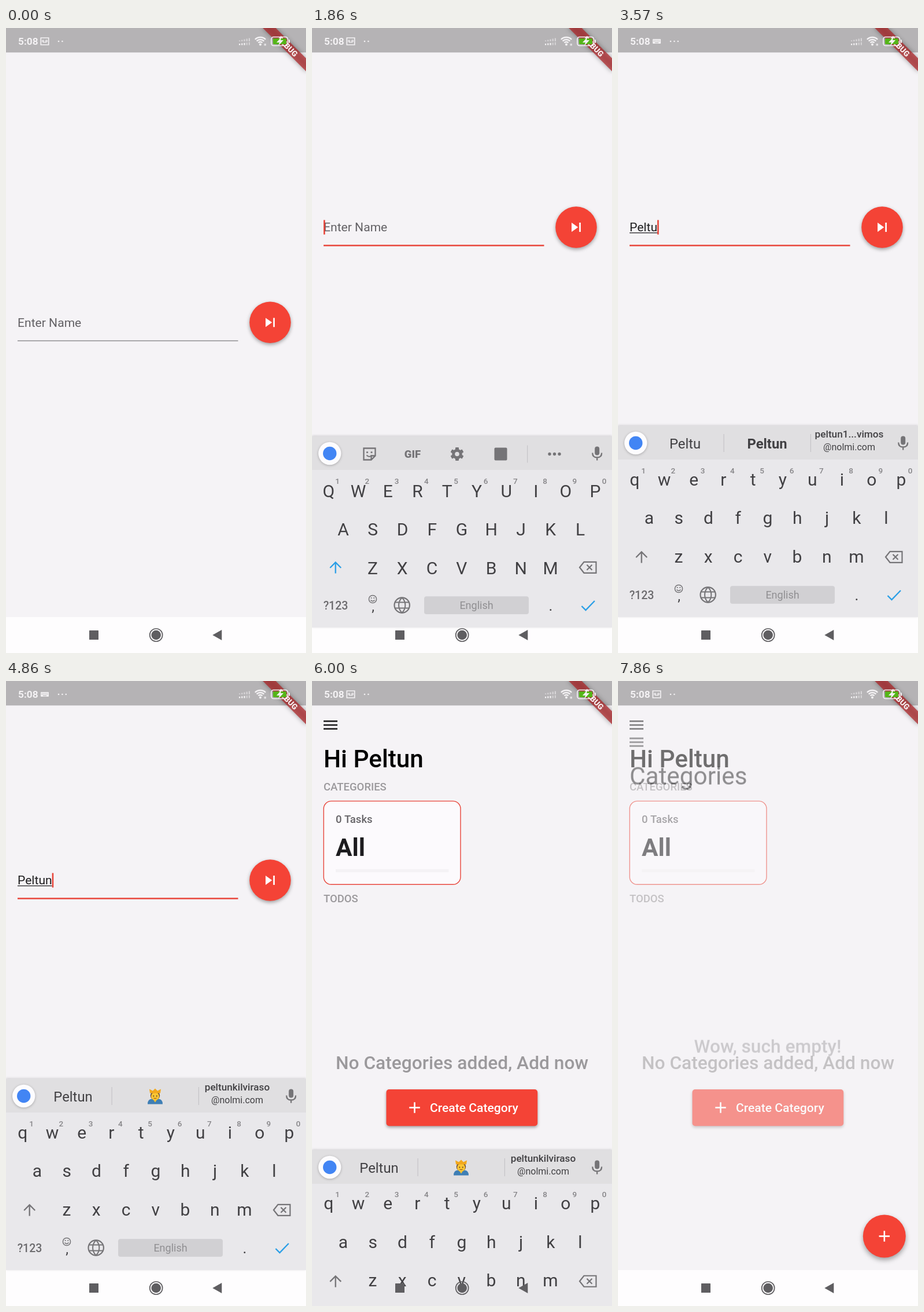
An HTML page with a canvas for the animation above (8 s loop, 519 px wide and 1079 px high).

```html
<!DOCTYPE html>
<html lang="en">
<head>
<meta charset="utf-8">
<title>Todo app walkthrough</title>
<style>
html, body { margin: 0; width: 100%; height: 100%; overflow: hidden; background: #f5f3f6; }
canvas { display: block; width: 519px; height: 1079px; }
</style>
</head>
<body>
<canvas id="stage" width="519" height="1079"></canvas>
<script>
const W = 519, H = 1079, LOOP = 8000, STEPS = 56;
const NAV_TOP = 1017, KB_TOP = 687, KB_ROWS = 745;
const RED = '#f44336', PAGE = '#f5f3f6', GREY = '#9b999c', KEY = '#414043', ICON = '#757477', BLUE = '#2b9fe6';
const NAME = 'Peltun';

const screen = document.getElementById('stage').getContext('2d');
const layer = document.createElement('canvas');
layer.width = W;
layer.height = H;
const layerCtx = layer.getContext('2d');
let c = screen;

// ---------- drawing helpers ----------
function text(str, x, y, size, color, weight = 400, align = 'left') {
  c.font = `${weight} ${size}px Roboto, sans-serif`;
  c.textAlign = align;
  c.fillStyle = color;
  c.fillText(str, x, y);
}

function rect(x, y, w, h, color, r = 0) {
  c.fillStyle = color;
  c.beginPath();
  c.roundRect(x, y, w, h, r);
  c.fill();
}

function disc(x, y, r, color) {
  c.fillStyle = color;
  c.beginPath();
  c.arc(x, y, r, 0, 7);
  c.fill();
}

function ring(x, y, r, width, color) {
  c.strokeStyle = color;
  c.lineWidth = width;
  c.beginPath();
  c.arc(x, y, r, 0, 7);
  c.stroke();
}

function shape(d, x, y, color, scale = 1) {
  c.save();
  c.translate(x, y);
  c.scale(scale, scale);
  c.fillStyle = color;
  c.fill(new Path2D(d));
  c.restore();
}

function stroke(d, x, y, color, width) {
  c.save();
  c.translate(x, y);
  c.strokeStyle = color;
  c.lineWidth = width;
  c.stroke(new Path2D(d));
  c.restore();
}

function shadowed(blur, dy, alpha, draw) {
  c.save();
  c.shadowColor = `rgba(0,0,0,${alpha})`;
  c.shadowBlur = blur;
  c.shadowOffsetY = dy;
  draw();
  c.restore();
}

function bezier(t, x1, y1, x2, y2) {
  const at = (u, a, b) => 3 * u * (1 - u) ** 2 * a + 3 * u * u * (1 - u) * b + u ** 3;
  let lo = 0, hi = 1;
  for (let i = 0; i < 24; i++) {
    const mid = (lo + hi) / 2;
    if (at(mid, x1, x2) < t) lo = mid; else hi = mid;
  }
  return at(lo, y1, y2);
}

// ---------- app pages ----------
function menuIcon(y) {
  for (const dy of [-6.6, 0, 6.6]) rect(20, y + dy - 1.3, 24, 2.6, '#1d1c1e');
}

function plus(x, y, size) {
  rect(x - size / 2, y - 1.3, size, 2.6, '#fff');
  rect(x - 1.3, y - size / 2, 2.6, size, '#fff');
}

function namePage(k) {
  const focused = k >= 12;
  const y = k >= 13 ? 344 : 508.3;
  const typed = NAME.slice(0, [19, 20, 22, 23, 25, 27].filter(s => k >= s).length);
  const cursor = (k >= 12 && k < 15) || (k >= 19 && k < 30) || (k >= 33 && k < 37);

  rect(0, 0, W, H, PAGE);
  text(typed || 'Enter Name', 20, y + 7.3, 21.1, typed ? '#1f1e20' : '#636165');
  const end = 20 + (typed ? c.measureText(typed).width : 0);
  if (typed) rect(20, y + 9, end - 20, 1.2, '#1f1e20');
  if (cursor) rect(end, y - 12.5, 2.6, 25, '#e8453a');
  if (focused) rect(20, y + 30.2, 381.5, 2.6, '#e8453a');
  else rect(20, y + 31, 381.5, 1.4, '#918f92');

  shadowed(6, 2.5, 0.36, () => disc(457, y, 35.8, RED));
  if (k >= 3 && k < 7) {
    disc(457, y, 9 * (k - 2), `rgba(255,255,255,${0.2 - 0.045 * (k - 3)})`);
  }
  shape('M-6 6L2.5 0L-6-6zM4-6h2v12h-2z', 457, y, '#fff', 1.32);
}

function homePage() {
  rect(0, 0, W, H, PAGE);
  menuIcon(76);
  text('Hi ' + NAME, 20, 149, 42.3, '#000', 500);
  text('CATEGORIES', 20, 189.3, 18.5, GREY, 500);
  rect(20.2, 207.4, 236.8, 143.8, '#fcfafd', 13);
  c.strokeStyle = '#e8453a';
  c.lineWidth = 1.4;
  c.stroke();
  text('0 Tasks', 41, 245, 18.5, '#666468', 500);
  text('All', 41, 302, 42.3, '#1d1c1f', 700);
  rect(41, 325, 195.5, 5.2, '#f4f2f5');
  text('TODOS', 20, 382.3, 18.5, GREY, 500);
  text('No Categories added, Add now', 259.5, 670, 31.7, GREY, 500, 'center');
  shadowed(5, 2.5, 0.34, () => rect(128.5, 705, 261.7, 63.3, RED, 5));
  plus(177.5, 736.5, 18.5);
  text('Create Category', 204, 743.8, 21.1, '#fff', 500);
}

function categoriesPage() {
  rect(0, 0, W, H, PAGE);
  menuIcon(76);
  text('Categories', 20, 149, 42.3, '#111');
  text('Wow, such empty!', 259, 612, 31.7, GREY, 500, 'center');
}

// A page fades in while it rises from a quarter of the height.
function enter(page, steps) {
  const t = Math.min(1, (steps + 0.3) / 2.1);
  c = layerCtx;
  page();
  c = screen;
  c.save();
  c.globalAlpha = bezier(t, 0.42, 0, 1, 1);
  c.drawImage(layer, 0, (1 - bezier(t, 0.4, 0, 0.2, 1)) * H / 4);
  c.restore();
}

// ---------- system bars ----------
function debugBanner() {
  c.save();
  c.translate(W, 0);
  c.rotate(Math.PI / 4);
  shadowed(8, 0, 0.5, () => rect(-53, 37, 106, 15.9, 'rgba(176,34,36,.7)'));
  text('DEBUG', 0, 49.7, 13.5, '#f7eeee', 900, 'center');
  c.restore();
}

function statusIcons(typing, k) {
  const white = '#f4f2f4';
  text('5:08', 21, 29, 17.3, white, 700);
  if (typing) {
    rect(60, 19, 14, 8, white, 1);
    for (let i = 0; i < 5; i++) {
      rect(61.3 + i * 2.5, 20.6, 1.2, 1.2, '#b5b3b5');
      rect(61.3 + i * 2.5, 22.8, 1.2, 1.2, '#b5b3b5');
    }
    rect(64, 25, 6, 1, '#b5b3b5');
  } else {
    stroke('M-6.7-6h13.4v12h-13.4z', 67, 23, white, 1.7);
    ring(64, 22.5, 1.4, 1.2, white);
    ring(70, 22.5, 1.4, 1.2, white);
    rect(64, 24, 6, 1.2, white);
  }
  for (let i = 0; i < (typing ? 3 : 2); i++) disc(91 + i * 6.4, 23, 1.3, white);

  for (let i = 0; i < 5; i++) {
    const x = 403 + i * 4.2;
    rect(x, 21.5 - i, 2.2, 1.5 + i, 'rgba(244,242,244,.55)');
    rect(x, 27 - i * 0.6, 2.2, 2.5 + i * 0.6, i < 3 ? white : 'rgba(244,242,244,.5)');
  }

  c.strokeStyle = white;
  c.lineWidth = 2.3;
  for (const r of [5, 9, 13]) {
    c.beginPath();
    c.arc(440, 29, r, -Math.PI * 0.75, -Math.PI * 0.25);
    c.stroke();
  }
  disc(440, 28.5, 2, white);
  if (k < 52) rect(446.5, 27, 3.5, 3.5, 'rgba(244,242,244,.7)');

  rect(462, 18, 23, 10, '#55b518', 1.5);
  c.strokeStyle = white;
  c.lineWidth = 1.7;
  c.beginPath();
  c.roundRect(459, 15.5, 28.5, 15, 4);
  c.stroke();
  rect(489, 20, 2, 6, white, 1);
  shape('M3-8L-6 2H-1L-3 8L6-2H1z', 474, 23, white);
}

function navIcons() {
  const dark = '#5f5e61';
  rect(144, 1040, 16, 16, dark, 0.5);
  ring(259.7, 1048, 11, 1.7, dark);
  disc(259.7, 1048, 8.3, dark);
  shape('M-8 0L8-9V9z', 365.3, 1048, dark);
}

// ---------- keyboard ----------
function person(x, y) {
  shape('M-13 13Q-13 4-5 4H5Q13 4 13 13z', x, y, '#3f7fb5');
  shape('M-4 4H4L0 10z', x, y, '#f1c232');
  disc(x, y - 2, 8.2, '#6b4a32');
  disc(x, y - 0.5, 7, '#fcc633');
  shape('M-9-6L-10-13L-4-10L0-14L4-10L10-13L9-6z', x, y, '#f2a81d');
  disc(x - 2.7, y - 1, 1, '#4c3826');
  disc(x + 2.7, y - 1, 1, '#4c3826');
  stroke('M-2.5 2.5Q0 4.2 2.5 2.5', x, y, '#7a4a1c', 1);
}

function toolIcons(y) {
  stroke('M-10-10H10V3L3 10H-10zM3 10V3H10', 99.5, y, ICON, 2.3);
  disc(95.5, y - 3, 1.6, ICON);
  disc(103, y - 3, 1.6, ICON);
  stroke('M-5 2Q0 7 4 2', 99.5, y, ICON, 2);
  text('GIF', 174, y + 6.5, 18.5, ICON, 900, 'center');

  ring(251, y, 6.3, 5, ICON);
  for (let i = 0; i < 6; i++) {
    c.save();
    c.translate(251, y);
    c.rotate(i * Math.PI / 3);
    rect(-3, -11.5, 6, 5, ICON, 1);
    c.restore();
  }
  rect(315.5, y - 11, 22, 22, ICON, 2);
  rect(372, y - 15, 1.2, 30, '#c5c4c7');
  for (const x of [411, 419.5, 428]) disc(x, y, 2.7, ICON);
}

function suggestions(k, y) {
  const rows = [
    [18, 'P', 'Please', 'Phone'],
    [21, 'Pe', 'People', 'Person'],
    [23, 'Pel', NAME, 'Pelican'],
    [24, 'Pelt', NAME, 'Pelted'],
    [25, 'Peltu', NAME, 'peltun1...vimos'],
    [28, NAME, '', 'peltunkilviraso'],
  ];
  const [, left, mid, right] = rows.filter(r => k >= r[0]).pop();
  rect(182.5, y - 15.5, 1.2, 31, '#c5c4c7');
  rect(332.8, y - 15.5, 1.2, 31, '#c5c4c7');
  text(left, 116, y + 9.3, 23.8, KEY, 400, 'center');
  if (mid) text(mid, 258, y + 9.3, 23.8, KEY, mid === NAME ? 700 : 400, 'center');
  else person(258, y + 1);
  if (k < 25) {
    text(right, 400, y + 9.3, 23.8, KEY, 400, 'center');
  } else {
    text(right, 400, y - 9.5, 17.2, KEY, 500, 'center');
    text('@nolmi.com', 400, y + 12.3, 16, KEY, 400, 'center');
  }
}

function keyboard(k, offset) {
  const upper = k < 18;
  const y = 716.5;
  c.save();
  c.translate(0, offset);
  shadowed(4, -1, 0.16, () => rect(0, KB_TOP, W, NAV_TOP - KB_TOP, '#e9e8eb'));
  rect(0, KB_TOP, W, KB_ROWS - KB_TOP, '#e0dfe1');

  shadowed(4, 1, 0.25, () => disc(30.7, y, 19.7, '#fdfcfe'));
  disc(30.7, y, 11.7, '#4285f4');
  if (upper) toolIcons(y + 1); else suggestions(k, y);
  rect(489.2, y - 12, 8, 15, ICON, 4);
  stroke('M-8-1Q-8 7 0 7Q8 7 8-1M0 7V12', 493.2, y, ICON, 2.3);

  const rows = [['qwertyuiop', 28.7, 789.5], ['asdfghjkl', 54, 856], ['zxcvbnm', 105, 922.5]];
  for (const [letters, x, base] of rows) {
    [...letters].forEach((ch, i) => {
      text(upper ? ch.toUpperCase() : ch, x + i * 51.25, base + (upper ? 2 : 0), 30, KEY, 400, 'center');
    });
  }
  for (let i = 0; i < 10; i++) text((i + 1) % 10, 44 + i * 51.3, 768.5, 13.5, '#858487', 500, 'center');

  stroke('M0 10V-8M-9.5 0.5L0-9L9.5 0.5', 40.7, 913.5, upper ? BLUE : ICON, 2.3);
  stroke('M-14.5 0L-7-9.5H14V9.5H-7zM-2-4.5L7 4.5M7-4.5L-2 4.5', 477.5, 913.3, ICON, 2.2);

  text('?123', 41, 986, 19.5, '#6c6b6e', 500, 'center');
  ring(105, 968, 6.6, 1.5, ICON);
  disc(102.7, 966, 1.1, ICON);
  disc(107.3, 966, 1.1, ICON);
  stroke('M-3.5 1.5Q0 5.5 3.5 1.5', 105, 968, ICON, 1.4);
  text(',', 105.5, 989, 24, KEY, 400, 'center');

  ring(155.7, 978.5, 13.2, 2.2, ICON);
  stroke('M-12-5H12M-12 5H12M0-13C-7.5-6-7.5 6 0 13C7.5 6 7.5-6 0-13', 155.7, 978.5, ICON, 2);
  rect(194, 963.3, 181, 30.7, '#d1d0d3', 4);
  text('English', 284.5, 985.3, 18, '#908f92', 400, 'center');
  text('.', 413, 988, 26, KEY, 400, 'center');
  stroke('M-11 1L-4 8L11.5-8', 477.5, 979, BLUE, 2.4);
  c.restore();
}

function keyboardOffset(k) {
  if (k === 13) return 18;
  return k > 41 ? 392 * (0.56 * (k - 41)) ** 2 : 0;
}

// ---------- timeline ----------
function draw(time) {
  const k = Math.min(STEPS - 1, Math.floor(time * STEPS / LOOP + 0.05));

  if (k < 42) namePage(k); else homePage();
  if (k === 40 || k === 41) enter(homePage, k - 40);
  if (k >= 54) enter(categoriesPage, k - 54);
  if (k >= 55) {
    shadowed(9, 4, 0.36, () => disc(460.8, 958.5, 37, RED));
    plus(460.8, 958.5, 18.5);
  }

  rect(0, 0, W, 42.3, '#b5b3b5');
  debugBanner();
  statusIcons(k >= 15 && k < 42, k);
  rect(0, NAV_TOP, W, H - NAV_TOP, '#fefdfe');
  if (k >= 13 && k < 43) keyboard(k, keyboardOffset(k));
  navIcons();
}

const start = performance.now();
function frame() {
  draw((performance.now() - start) % LOOP);
  requestAnimationFrame(frame);
}
frame();
</script>
</body>
</html>
```
